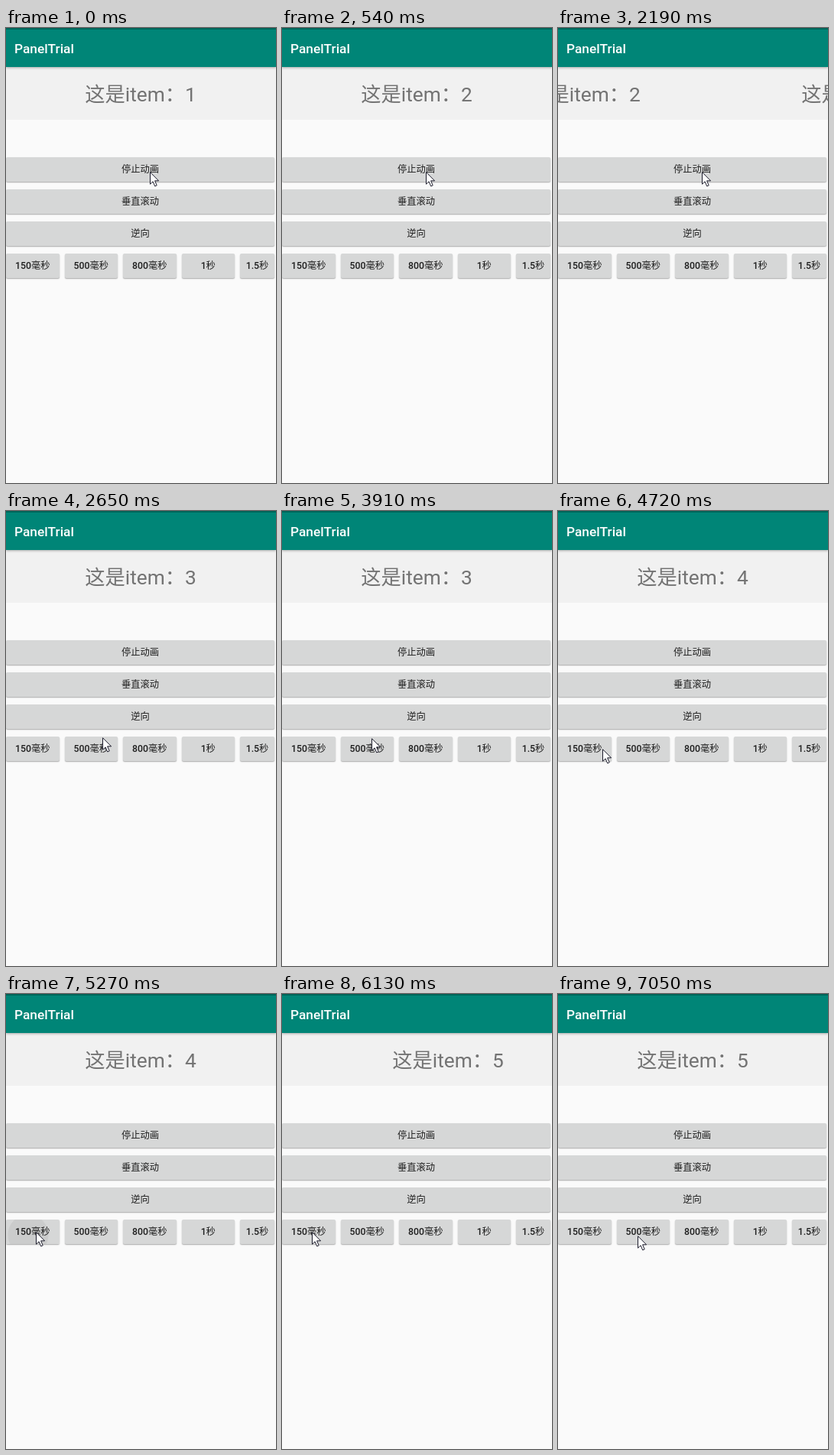
Write an HTML page that moves like this. It is 353x595 px and loops after 8000 ms.

```html
<!DOCTYPE html>
<html lang="zh-CN">
<head>
<meta charset="utf-8">
<title>PanelTrial</title>
<style>
  html, body { margin: 0; width: 100%; height: 100%; overflow: hidden; background: #fafafa; }
  #stage {
    position: relative; width: 353px; height: 595px; overflow: hidden; background: #fafafa;
    font: 12.25px Roboto, "Noto Sans CJK SC", "Noto Sans CJK", sans-serif; color: #1e1e1e;
  }
  #stage > *, .item { position: absolute; white-space: nowrap; }
  #bar {
    left: 0; top: 0; width: 342px; height: 48.5px; padding-left: 11px; border-top: 2px solid #00655a;
    background: #008577; box-shadow: 0 1px 3px rgba(0, 0, 0, .3);
    color: #fff; font-size: 17.3px; font-weight: 500; line-height: 50px;
  }
  #band { left: 0; top: 50px; width: 353px; height: 70px; overflow: hidden; background: #f1f1f1; }
  .item { left: 0; top: 0; width: 352px; line-height: 74px; text-align: center; font-size: 26.3px; color: #737373; }
  .btn {
    height: 32px; line-height: 32px; text-align: center; overflow: hidden;
    background: #d6d7d7; border-radius: 2px; box-shadow: 0 1px 1.5px rgba(0, 0, 0, .32);
  }
  .btn b { font-weight: 500; }
  .btn.pressed { background: #c3c4c4; box-shadow: 0 2px 3px rgba(0, 0, 0, .35); }
  .btn.fading { background: radial-gradient(circle at 29px 20px, #cbcccc 26px, #d6d7d7 27px); }
  .wide { left: 0; width: 351px; }
  .small { top: 294.5px; width: 69.5px; }
  #cursor { left: 0; top: 0; overflow: visible; }
</style>
</head>
<body>
<div id="stage">
  <div id="band"><div class="item" id="leaving"></div><div class="item" id="showing"></div></div>
  <div id="bar">PanelTrial</div>
  <div class="btn wide" style="top:169px">停止动画</div>
  <div class="btn wide" style="top:211px">垂直滚动</div>
  <div class="btn wide" style="top:253px">逆向</div>
  <div class="btn small" id="fast" style="left:0"><b>150</b>毫秒</div>
  <div class="btn small" style="left:76.5px"><b>500</b>毫秒</div>
  <div class="btn small" style="left:153px"><b>800</b>毫秒</div>
  <div class="btn small" style="left:229.5px"><b>1</b>秒</div>
  <div class="btn small" style="left:306px;width:45px"><b>1.5</b>秒</div>
  <svg id="cursor" width="13" height="20">
    <path d="M.5 .7V16.2L4.1 12.8L6.7 18.9L9.2 17.8L6.6 11.8H11.6Z" fill="#fff" stroke="#1c1c2c" stroke-width="1"/>
  </svg>
</div>
<script>
const LOOP = 8000, PAGE = 356;
const $ = id => document.getElementById(id);

// The screen is only refreshed at these moments.
const ticks = [0, 140, 260, 410, 540, 2190, 2350, 2490, 4060, 4180, 4330, 4480, 6130, 6250];
// Start and duration of each page flip.
const flips = [[85, 378], [2026, 378], [4005, 378], [6013, 150]];
// Time, x and y of the pointer.
const moves = [
  [0, 188, 188], [2490, 163, 235], [2650, 126, 296], [2800, 125, 296], [2950, 121, 296],
  [3910, 117, 297], [4060, 110, 301], [4180, 97, 304], [4330, 82, 305], [4480, 70, 308],
  [4600, 62, 310], [4720, 58, 311], [4870, 48, 311], [5000, 39, 311],
  [6680, 50, 312], [6800, 74, 314], [6920, 95, 316], [7050, 104, 316]
];

const ease = x => (1 - Math.cos(Math.PI * Math.min(1, x))) / 2;

function place(el, number, x) {
  el.textContent = "这是item：" + number;
  el.style.transform = `translateX(${Math.round(x)}px)`;
}

function draw(t) {
  const now = ticks.findLast(k => k <= t);
  const n = flips.filter(f => f[0] <= now).length;
  const p = n ? ease((now - flips[n - 1][0]) / flips[n - 1][1]) : 1;
  place($("showing"), n + 1, PAGE * (1 - p));
  place($("leaving"), n, -PAGE * p);
  // The first and the quick flip show no outgoing page.
  $("leaving").style.visibility = n === 2 || n === 3 ? "visible" : "hidden";

  const [, x, y] = moves.findLast(m => m[0] <= t);
  $("cursor").style.transform = `translate(${x}px, ${y}px)`;

  $("fast").classList.toggle("pressed", t >= 5140 && t < 5270);
  $("fast").classList.toggle("fading", t >= 5270 && t < 5420);
}

const start = performance.now();
function frame() {
  draw((performance.now() - start) % LOOP);
  requestAnimationFrame(frame);
}
frame();
</script>
</body>
</html>
```
